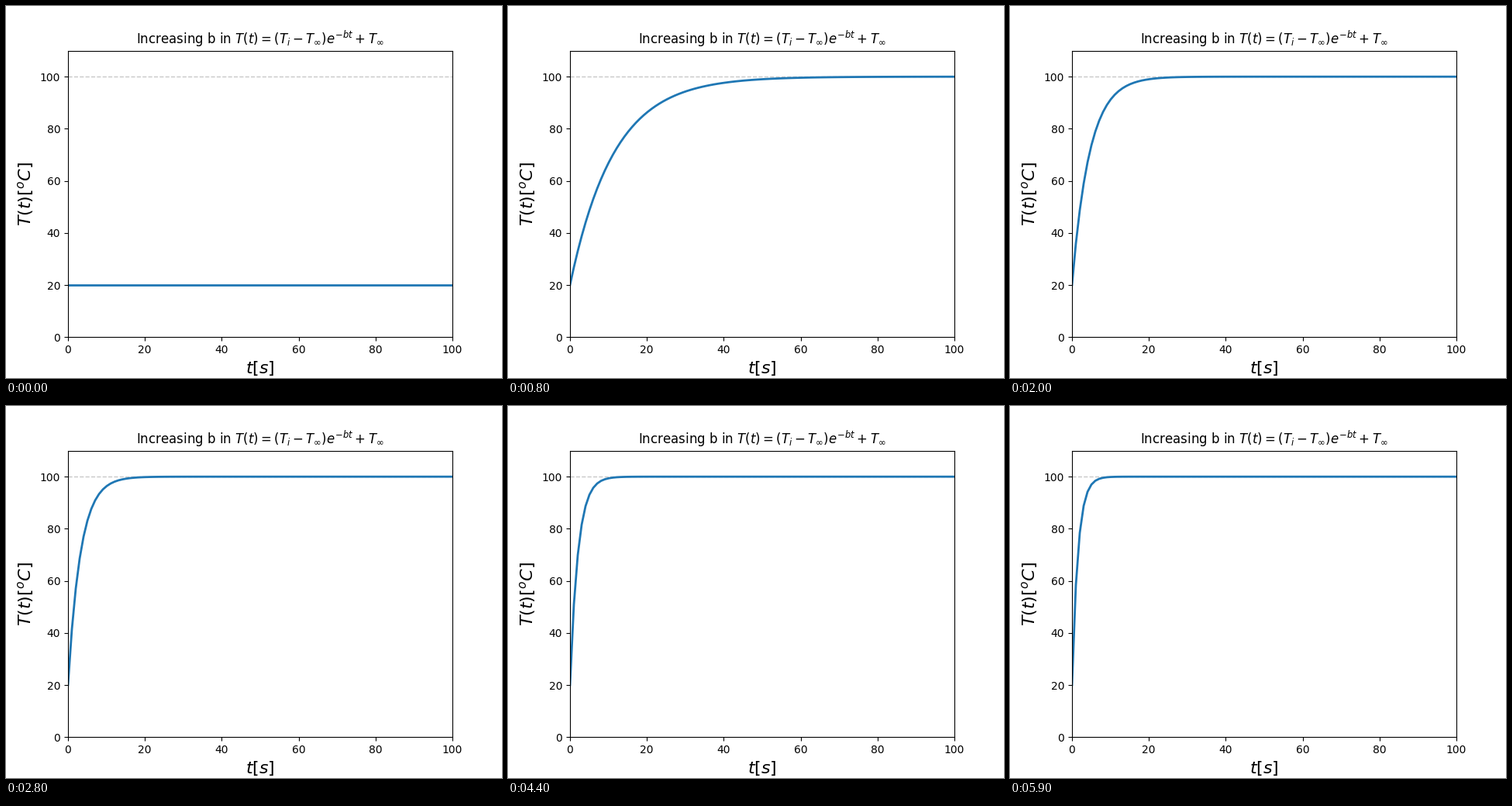
Recreate the animation shown at these times as a matplotlib script. Size 640x480 px, loop 6 s.

```python
import numpy as np
import matplotlib.pyplot as plt
from matplotlib.animation import FuncAnimation

FRAMES, INTERVAL = 60, 100
T_START, T_END = 20, 100
B_STEP = 0.011

t = np.linspace(0, 100, 100)


def temperature(b):
    return (T_START - T_END) * np.exp(-b * t) + T_END


fig, ax = plt.subplots(figsize=(6.4, 4.8), dpi=100)
ax.set_xlim(0, 100)
ax.set_ylim(0, 110)
ax.set_title(r"Increasing b in $T(t)=(T_i-T_\infty)e^{-bt}+T_\infty$")
ax.set_xlabel("$t[s]$", fontsize=16)
ax.set_ylabel("$T(t)[^oC]$", fontsize=16)
ax.axhline(T_END, color="#c8c8c8", ls="--", lw=1)
curve, = ax.plot(t, temperature(0), color="C0", lw=2)


def update(i):
    curve.set_ydata(temperature(B_STEP * i))
    return curve,


anim = FuncAnimation(fig, update, frames=FRAMES, interval=INTERVAL,
                     repeat=True, repeat_delay=0)
plt.show()
```
